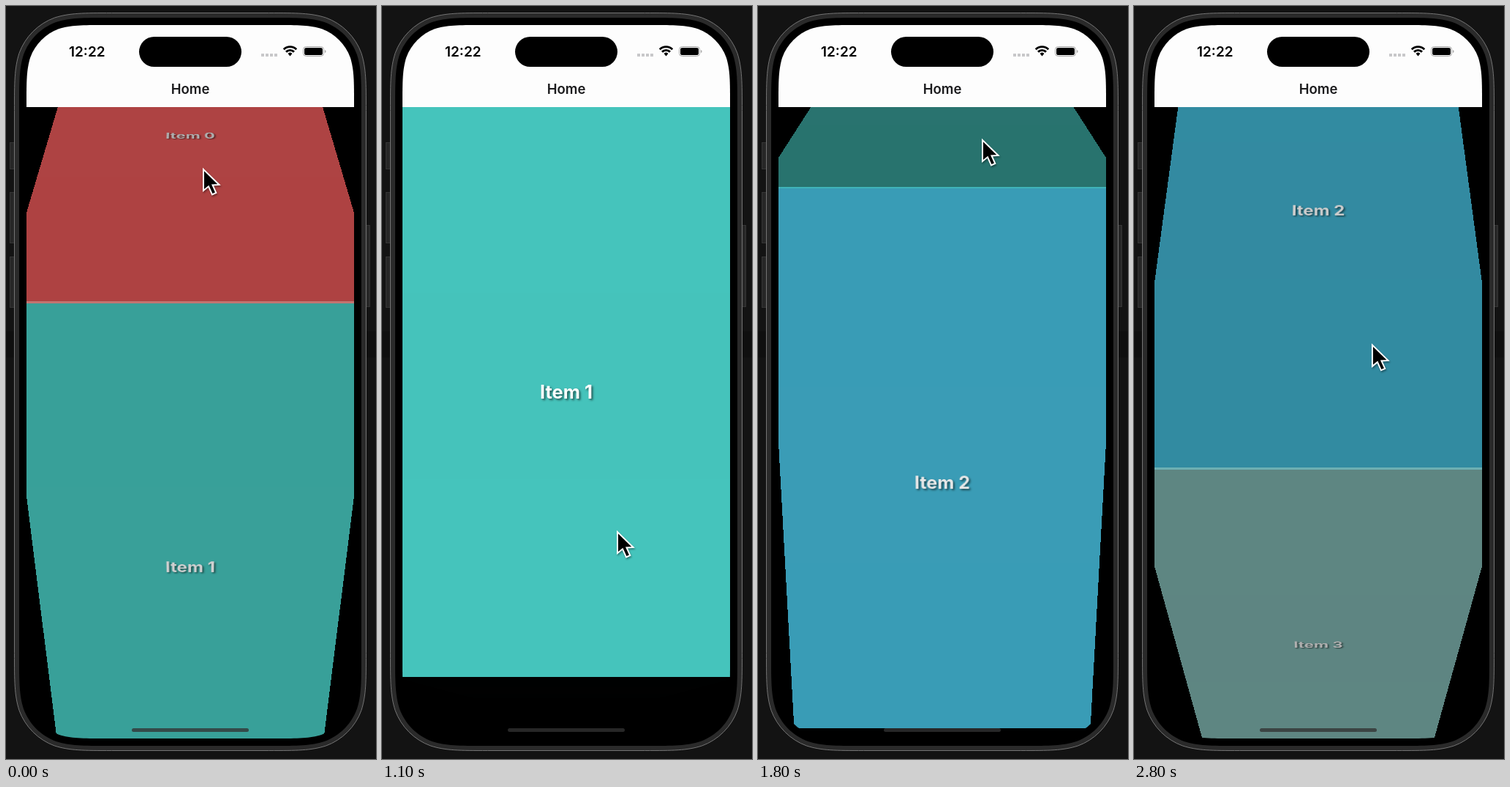
An HTML page that plays this animation: 506x1028 px, repeating every 2900 ms.

```html
<!DOCTYPE html>
<html lang="en">
<head>
<meta charset="utf-8">
<title>Prism pager</title>
<style>
  html, body { margin: 0; width: 100%; height: 100%; overflow: hidden; background: #131313; }
  body { font-family: Inter, "Liberation Sans", sans-serif; font-weight: 600; }
  div, svg { position: absolute; box-sizing: border-box; }
  #stage { left: 0; top: 0; width: 506px; height: 1028px; overflow: hidden;
    background: linear-gradient(#131313 0 444px, #0f0f0f 444px 480px, #131313 480px); }
  .key { width: 9px; background: #272727; border: 1px solid #353535; }
  #body { left: 0; top: 0; }
  #screen { left: 28px; top: 26px; width: 448px; height: 974px; overflow: hidden; background: #000; }
  #view { left: 0; top: 112px; width: 448px; height: 862px; overflow: hidden;
    perspective: 779px; perspective-origin: 224px 389.5px; }
  .face { left: 0; top: 0; width: 448px; height: 779px; display: flex;
    align-items: center; justify-content: center; color: #fff; font-size: 25.5px; font-weight: 700;
    text-shadow: 2px 2px 3px rgba(0, 0, 0, .55); }
  #bar { left: 0; top: 0; width: 448px; height: 112px; background: #fdfdfd; color: #1b1b1d; }
  #clock { left: 58px; top: 25px; line-height: 23px; font-size: 19px; color: #000; }
  #title { left: 0; top: 76px; width: 448px; line-height: 23px; font-size: 18.5px; text-align: center; }
  #island { left: 154px; top: 16px; width: 140px; height: 41px; border-radius: 21px; background: #000; }
  #home { left: 144px; top: 960px; width: 160px; height: 5px; border-radius: 3px;
    background: rgba(50, 50, 50, .78); }
  #status { left: 320px; top: 26px; }
  #cursor { left: 0; top: 0; overflow: visible; filter: drop-shadow(1px 2px 1px rgba(0, 0, 0, .35)); }
</style>
</head>
<body>
<div id="stage">
  <div class="key" style="left:5px;top:186px;height:37px"></div>
  <div class="key" style="left:5px;top:254px;height:70px"></div>
  <div class="key" style="left:5px;top:342px;height:70px"></div>
  <div class="key" style="left:489px;top:299px;height:112px"></div>
  <svg id="body" width="506" height="1028">
    <path id="rim" fill="#2a2a2a" stroke="#747474"/>
    <path id="bezel"/>
  </svg>
  <div id="screen">
    <div id="view"></div>
    <div id="bar">
      <div id="clock">12:22</div>
      <div id="title">Home</div>
      <div id="island"></div>
      <svg id="status" width="92" height="22">
        <path d="M3 13v4m6 -4v4m6 -4v4m6 -4v4" stroke="#c8c8ca" stroke-width="4"/>
        <g fill="none" stroke="#000" stroke-width="2.9">
          <path d="M31.8 7.2A12.4 12.4 0 0 1 49.2 7.2"/>
          <path d="M35 10.6A7.9 7.9 0 0 1 46 10.6"/>
        </g>
        <path d="M37.6 13A4.2 4.2 0 0 1 43.4 13L40.5 16.6Z"/>
        <rect x="58.5" y="3.5" width="28" height="13" rx="4" fill="none" stroke="#a5a5a5"/>
        <rect x="60" y="5" width="25" height="10" rx="2.8"/>
        <path d="M88 8q1.6 .6 1.6 2t-1.6 2z" fill="#a5a5a5"/>
      </svg>
    </div>
    <div id="home"></div>
  </div>
  <svg id="cursor" width="24" height="38">
    <path d="M1 2V31L8 25.3L13 36.4L18.3 34L13.5 23.5L22.5 23Z" stroke="#fff" stroke-width="2"/>
  </svg>
</div>
<script>
  const LOOP = 2900, STEP = 100;   // the picture advances in 100 ms steps
  const ANGLE = Math.PI / 3, APOTHEM = 779 / 2 / Math.tan(ANGLE / 2);
  const colors = ['255,98,98', '69,196,188', '63,172,200', '136,193,188'];
  const $ = id => document.getElementById(id);

  // Rectangle with continuous-curvature corners
  function squircle(x, y, w, h, r) {
    const corner = [[1.529, 0], [1.089, 0], [.868, 0], [.631, .075], [.373, .169]];
    const half = corner.map(([a, b]) => [a * r, b * r]);
    const turn = [...half, ...half.map(([a, b]) => [b, a]).reverse()];
    const mirror = (fx, fy) => turn.map(([a, b]) => [fx ? x + w - a : x + a, fy ? y + h - b : y + b]);
    return [mirror(0, 0), mirror(0, 1).reverse(), mirror(1, 1), mirror(1, 0).reverse()]
      .map((p, i) => (i ? 'L' : 'M') + p[0] + 'C' + p.slice(1).join(' ')).join('') + 'Z';
  }
  $('rim').setAttribute('d', squircle(11.5, 9.5, 481, 1007, 87));
  $('bezel').setAttribute('d', squircle(18, 16, 468, 994, 80));
  $('screen').style.clipPath = `path("${squircle(0, 0, 448, 974, 70)}")`;

  const easeOut = (f, power) => 1 - (1 - f) ** power;
  const clamp = f => Math.max(0, Math.min(1, f));

  // One swipe: a slowing drag, then a damped spring to the next page
  const DRAG = .626, DRAG_MS = 525, RELEASE_MS = 562, DAMP = 5, FREQ = 8.4;
  function swipe(ms) {
    if (ms < RELEASE_MS) return DRAG * easeOut(clamp(ms / DRAG_MS), 2);
    const s = (ms - RELEASE_MS) / 1000;
    const wave = Math.cos(FREQ * s) + DAMP / FREQ * Math.sin(FREQ * s);
    return 1 - (1 - DRAG) * Math.exp(-DAMP * s) * wave;
  }
  const pageAt = t => [-582, 1100, 2600].reduce((sum, start) => sum + swipe(t - start), 0);

  // Pointer turning points: [ms, x, y]
  const turns = [
    [40, 269, 221], [1100, 321, 716], [1800, 306, 181],
    [2500, 332, 760], [2600, 332, 760], [3300, 315, 247]
  ];
  function pointerAt(t) {
    const n = turns.findIndex(k => k[0] > t);
    const b = turns[n], a = turns[n - 1] || b;
    const f = clamp((t - a[0]) / (b[0] - a[0] || 1));
    return [1, 2].map(i => a[i] + (b[i] - a[i]) * easeOut(f, i === 1 ? 1.6 : 2.6));
  }

  const faces = colors.map((rgb, i) => {
    const el = document.createElement('div');
    el.className = 'face';
    el.style.background = `rgb(${rgb})`;
    el.textContent = 'Item ' + i;
    $('view').append(el);
    return el;
  });

  function draw(t) {
    const page = pageAt(t);
    faces.forEach((el, i) => {
      const angle = (page - i) * ANGLE, d = Math.abs(page - i), grow = angle * angle;
      const s = el.style;
      s.visibility = d < 1 ? 'visible' : 'hidden';
      s.opacity = clamp(Math.min(1 - d / 2, 3.5 * (1 - d)));
      s.zIndex = Math.round(d * 100);
      s.transform = `translateZ(${-APOTHEM}px) rotateX(${angle}rad) ` +
        `translateZ(${APOTHEM}px) scale(${1 + .04 * grow}, ${1 + .015 * grow})`;
    });
    const [x, y] = pointerAt(t);
    $('cursor').style.transform = `translate(${x}px, ${y}px)`;
  }

  const start = performance.now();
  function tick() {
    const t = (performance.now() - start) % LOOP;
    draw(Math.floor(t / STEP) * STEP);
    requestAnimationFrame(tick);
  }
  tick();
</script>
</body>
</html>
```
